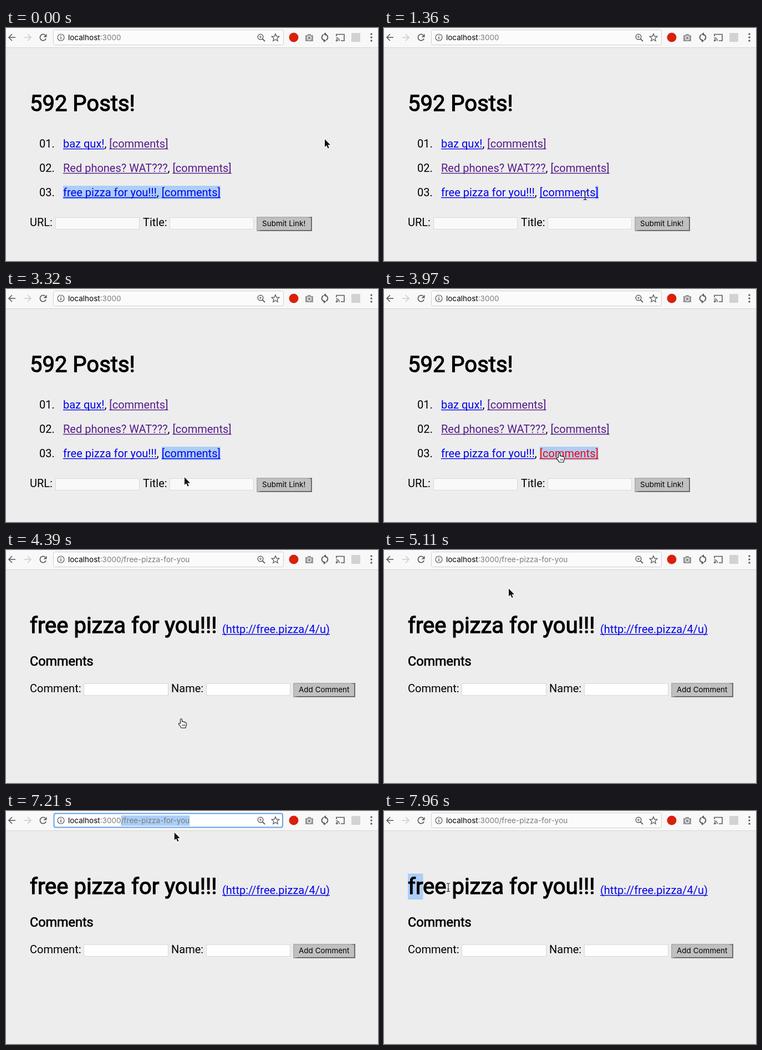
An HTML page with a canvas that plays this animation: 671x421 px, repeating every 8 s.

```html
<!DOCTYPE html>
<html lang="en">
<head>
<meta charset="utf-8">
<title>Link list demo</title>
<style>
html, body { margin: 0; width: 100%; height: 100%; overflow: hidden; background: #ededed; }
canvas { display: block; }
</style>
</head>
<body>
<canvas id="stage" width="671" height="421"></canvas>
<script>
const c = document.getElementById('stage').getContext('2d');
const LOOP = 8000, LAG = 50;
const BLUE = '#0000ee', VISITED = '#551a8b', MARK = '#accef7', ICON = '#5c5c5c';
const page = size => size + 'px Roboto, sans-serif';
const ui = '13.5px Inter, sans-serif';

// Pointer path: time, x, y, shape (a = arrow, i = text beam, h = hand)
const path = [
  [0, 575, 201, 'a'], [170, 575, 201, 'a'], [470, 466, 272, 'a'],
  [770, 466, 272, 'a'], [950, 423, 301, 'a'],
  [1190, 423, 301, 'a'], [1250, 402, 302, 'i'], [1360, 363, 303, 'i'], [1690, 282, 301, 'i'],
  [1750, 284, 301, 'i'], [1930, 284, 301, 'i'], [2340, 280, 307, 'i'],
  [2510, 280, 307, 'i'], [2570, 292, 307, 'h'], [2680, 322, 306, 'h'],
  [3150, 322, 306, 'h'], [3270, 322, 328, 'a'], [3350, 322, 347, 'i'],
  [3450, 321, 340, 'a'], [3550, 318, 309, 'h'], [3670, 316, 296, 'h'],
  [4300, 316, 296, 'h'], [4440, 316, 309, 'a'], [4650, 316, 309, 'a'],
  [5110, 225, 70, 'a'], [5230, 222, 50, 'a'],
  [5410, 222, 50, 'a'], [5570, 214, 28, 'i'], [5690, 210, 19, 'i'],
  [5960, 210, 19, 'i'], [6130, 259, 20, 'i'], [6190, 267, 20, 'i'], [6700, 345, 21, 'i'],
  [6910, 343, 20, 'a'], [7150, 343, 20, 'a'], [7450, 150, 112, 'i'], [7640, 43, 146, 'i'],
  [7860, 43, 146, 'i'], [7910, 72, 143, 'i'], [7960, 116, 138, 'i']
];

function pointer(t) {
  const i = path.findLastIndex(k => k[0] <= t);
  const [t0, x0, y0, shape] = path[i], [t1, x1, y1] = path[i + 1] || [LOOP, x0, y0];
  // A shape swap after a pause happens at once
  const f = t0 === 6700 ? 0 : (t - t0) / (t1 - t0);
  return { x: x0 + (x1 - x0) * f, y: y0 + (y1 - y0) * f, shape };
}

function width(s, font) {
  c.font = font;
  return c.measureText(s).width;
}

function put(s, x, y, font, color = '#000', bold = 0) {
  const w = width(s, font);
  c.fillStyle = c.strokeStyle = color;
  c.fillText(s, x, y);
  if (bold) {
    c.lineWidth = bold;
    c.strokeText(s, x, y);
  }
  return x + w;
}

function link(s, x, y, color) {
  const end = put(s, x, y, page(20), color);
  c.fillRect(x, y + 1.8, end - x, 1.4);
  return end;
}

function box(x, y, w, h, color) {
  c.fillStyle = color;
  c.fillRect(x, y, w, h);
}

function line(points, color, w, closed) {
  c.beginPath();
  points.forEach(([x, y]) => c.lineTo(x, y));
  if (closed) c.closePath();
  c.strokeStyle = color;
  c.lineWidth = w;
  c.stroke();
}

function arc(x, y, r, color, w, from = 0, to = 2 * Math.PI) {
  c.beginPath();
  c.arc(x, y, r, from, to);
  c.fillStyle = c.strokeStyle = color;
  c.lineWidth = w;
  w ? c.stroke() : c.fill();
}

function tri(x1, y1, x2, y2, x3, y3, color) {
  c.beginPath();
  c.moveTo(x1, y1);
  c.lineTo(x2, y2);
  c.lineTo(x3, y3);
  c.fillStyle = color;
  c.fill();
}

// Character edge of s closest to x
function snap(s, left, x, font) {
  let best = left;
  for (let i = 1; i <= s.length; i++) {
    const edge = left + width(s.slice(0, i), font);
    if (Math.abs(edge - x) < Math.abs(best - x)) best = edge;
  }
  return best;
}

function field(x, y, w, fill) {
  box(x, y, w, 22, '#d9d9d9');
  box(x + 1, y + 1, w - 2, 20, fill);
}

function button(s, x, y, w) {
  box(x, y, w, 26, '#6b6b6b');
  tri(x, y, x + w, y, x, y + 26, '#b2b2b2');
  box(x + 2, y + 2, w - 4, 22, '#c0c0c0');
  put(s, x + 10, y + 17, ui);
}

function arrowIcon(x, dir, color) {
  line([[x - 6 * dir, 17], [x + 6 * dir, 17]], color, 1.6);
  line([[x, 11], [x + 6 * dir, 17], [x, 23]], color, 1.6);
}

function toolbar(t, url) {
  box(0, 0, 671, 35, '#f8f8f8');
  box(0, 35, 671, 1, '#d4d4d4');
  arrowIcon(11, -1, ICON);
  arrowIcon(39, 1, '#cecece');
  arc(67, 17, 5.6, ICON, 1.7, 0.4, 5.4);
  tri(73.5, 10.5, 73.5, 16.5, 67.5, 16.5, ICON);

  const focus = t >= 5960 && t < 7760;
  c.beginPath();
  c.roundRect(focus ? 86.5 : 85.5, focus ? 4.5 : 3.5, focus ? 412.5 : 415, focus ? 25 : 27, 3);
  c.fillStyle = focus ? '#fff' : '#fbfbfb';
  c.fill();
  c.strokeStyle = focus ? '#62a3ea' : '#cfcfcf';
  c.lineWidth = focus ? 2 : 1;
  c.stroke();

  arc(99, 17, 6, ICON, 1.2);
  box(98.3, 16, 1.5, 4.5, ICON);
  box(98.3, 13.3, 1.5, 1.5, ICON);

  const start = 112 + width('localhost:3000', ui);
  if (focus) {
    const end = snap(url.slice(5), start, pointer(Math.min(t, 6750) - LAG).x, ui);
    box(start, 8, end - start, 19, MARK);
  }
  put(url, put('localhost', 112, 22, ui), 22, ui, '#7c7c7c');

  arc(459, 16, 4.8, ICON, 1.4);
  line([[462.5, 19.5], [467, 24]], ICON, 1.8);
  line([[456.6, 16], [461.4, 16]], ICON, 1);
  line([[459, 13.6], [459, 18.4]], ICON, 1);

  const star = Array.from({ length: 10 }, (_, i) => {
    const r = i % 2 ? 3.2 : 7.2, a = i * Math.PI / 5;
    return [486 + r * Math.sin(a), 17.6 - r * Math.cos(a)];
  });
  line(star, ICON, 1.3, true);

  arc(519, 17, 8.5, '#d9200d', 0);

  box(540, 13, 14, 11, '#959595');
  box(544, 11, 6, 3, '#959595');
  arc(547, 18, 3.4, '#f8f8f8', 1.4);

  arc(575, 17, 5.4, ICON, 2, -1.3, 1.1);
  arc(575, 17, 5.4, ICON, 2, 1.85, 4.25);
  tri(577, 8, 577, 14, 572.5, 11, ICON);
  tri(573, 20, 573, 26, 577.5, 23, ICON);

  line([[596, 15], [596, 11.5], [610, 11.5], [610, 23], [604, 23]], ICON, 1.6);
  for (const r of [3, 6]) arc(595.5, 23.5, r, ICON, 1.4, -Math.PI / 2, 0);
  arc(596, 23, 1.3, ICON, 0);

  box(623, 9, 16, 16, '#d2d2d2');
  for (const y of [11, 17, 23]) arc(659, y, 1.7, ICON, 0);
}

function listPage(t) {
  const body = page(20), last = 'free pizza for you!!!', tail = '[comments]';
  put('592 Posts!', 43, 150, page(40), '#000', 1.2);

  const tailX = 103 + width(last + ', ', body), endX = tailX + width(tail, body);
  let from = endX;
  if (t < 410) from = 103;
  else if (t >= 1190) from = t > 1740 ? tailX : snap(tail, tailX, pointer(t - LAG).x, body);
  box(from, 285, endX - from, 24, MARK);

  const rows = [['baz qux!', BLUE, VISITED], ['Red phones? WAT???', VISITED, VISITED],
    [last, BLUE, t >= 3970 ? '#ff0000' : BLUE]];
  rows.forEach(([title, color, tailColor], i) => {
    const y = 216 + 44 * i;
    put('0' + (i + 1) + '.', 60, y, body);
    link(tail, put(', ', link(title, 103, y, color), y, body), y, tailColor);
  });

  put('URL:', 43, 358, body);
  field(89, 342, 152, '#f9f9f9');
  put('Title:', 247, 358, body);
  field(295, 342, 152, '#f9f9f9');
  button('Submit Link!', 452, 341, 100);
}

function commentPage(t) {
  const title = 'free pizza for you!!!', body = page(20), big = page(40);
  if (t >= 7860) {
    const end = snap(title, 43, pointer(t - LAG).x, big);
    box(43, 113, end - 43, 47, MARK);
  }
  put(title, 43, 150, big, '#000', 1.2);
  link('(http://free.pizza/4/u)', 390, 150, BLUE);
  put('Comments', 43, 209, page(23.4), '#000', 0.7);
  put('Comment:', 43, 257, body);
  field(140, 241, 153, '#fefefe');
  put('Name:', 298, 257, body);
  field(361, 241, 152, '#fefefe');
  button('Add Comment', 518, 240, 112);
}

const outlines = {
  a: new Path2D('M0 0V14L3.2 11L5.6 16.5L7.8 15.6L5.4 10.3H10Z'),
  i: new Path2D('M-3 -7.5Q0 -7.5 0 -5.5Q0 -7.5 3 -7.5M0 -5.5V5.5M-3 7.5Q0 7.5 0 5.5Q0 7.5 3 7.5M-1.5 3H1.5'),
  h: new Path2D('M-1.5 9V1.5Q0 -1 1.5 1.5V6Q3.5 4.5 4.5 6.5Q6.5 5.5 7.2 7.3Q9.5 7 9.5 9.5V12Q8 14 8 17H0Q-1 14 -4.5 10.5Q-5 8 -2.5 8.8Z')
};

function drawPointer({ x, y, shape }) {
  const p = outlines[shape];
  c.save();
  c.translate(x, y);
  c.lineJoin = 'round';
  if (shape === 'h') {
    c.fillStyle = '#fff';
    c.fill(p);
    c.strokeStyle = '#111';
    c.lineWidth = 1.1;
    c.stroke(p);
    for (const k of [2.2, 4.4, 6.6]) line([[k, 10.5], [k, 14]], '#111', 0.8);
  } else {
    c.strokeStyle = shape === 'a' ? '#fff' : 'rgba(255,255,255,.6)';
    c.lineWidth = 2.4;
    c.stroke(p);
    c.fillStyle = c.strokeStyle = '#111';
    c.lineWidth = 1.1;
    shape === 'a' ? c.fill(p) : c.stroke(p);
  }
  c.restore();
}

function draw(now) {
  const t = now % LOOP, opened = t >= 4090;
  box(0, 0, 671, 421, '#ededed');
  toolbar(t, opened ? ':3000/free-pizza-for-you' : ':3000');
  opened ? commentPage(t) : listPage(t);
  drawPointer(pointer(t));
  requestAnimationFrame(draw);
}
requestAnimationFrame(draw);
</script>
</body>
</html>
```
